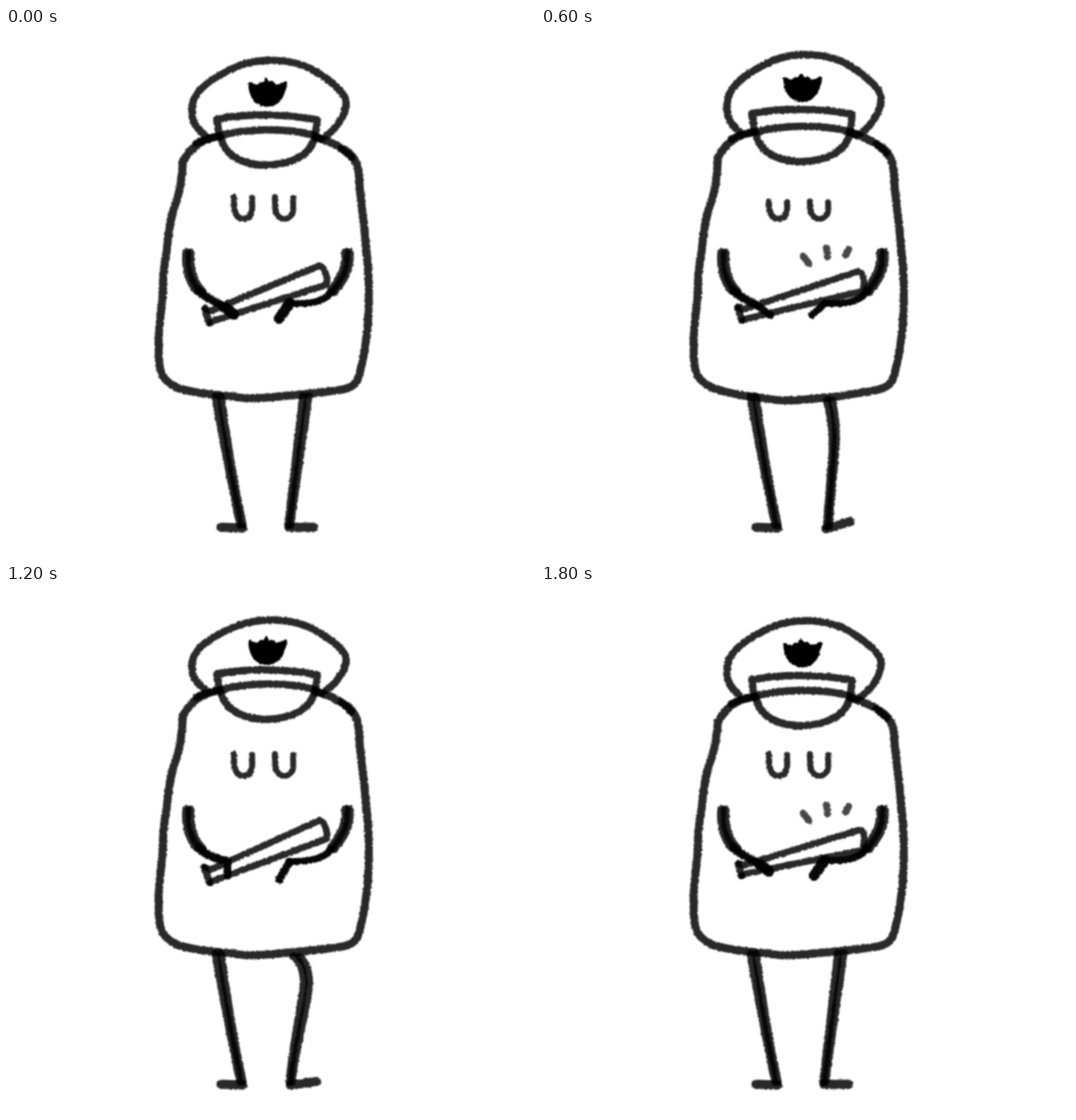
An HTML page that plays this animation: 748x748 px, repeating every 2 s.

```html
<!DOCTYPE html>
<html lang="en">
<head>
<meta charset="utf-8">
<title>Waiting officer</title>
<style>
  html, body { margin: 0; width: 100%; height: 100%; overflow: hidden; background: #fff; }
  svg { display: block; width: 100vw; height: 100vh; }
</style>
</head>
<body>
<svg viewBox="0 0 748 748">
  <defs>
    <filter id="chalk" filterUnits="userSpaceOnUse" x="0" y="0" width="748" height="748" color-interpolation-filters="sRGB">
      <feTurbulence type="fractalNoise" baseFrequency=".3" numOctaves="2" seed="4" result="grain"/>
      <feDisplacementMap in="SourceGraphic" in2="grain" scale="3.6" xChannelSelector="R" yChannelSelector="G"/>
      <feGaussianBlur stdDeviation=".8"/>
    </filter>
  </defs>
  <g id="art" filter="url(#chalk)" fill="none" stroke="#000" stroke-linecap="round" stroke-linejoin="round"></g>
</svg>
<script>
const STEP = 200;

const line = (d, w = 10.5, o = 0.84) => `<path d="${d}" stroke-width="${w}" stroke-opacity="${o}"/>`;
const at = (x, y, s) => `<g transform="translate(${x} ${y})">${s}</g>`;
const thick = (d, off, w = 10) => at(-off, 0, line(d, w)) + at(off, 0, line(d, w));

// Baton corners: grip top, tip top, tip bottom, grip bottom
const batons = {
  mid:  [[282, 397], [443, 336], [453, 363], [288, 417]],
  down: [[281, 399], [443, 333], [453, 359], [289, 421]],
  hit:  [[279, 395], [449, 344], [455, 372], [285, 414]],
  rest: [[280, 394], [451, 346], [455, 375], [284, 411]],
  up:   [[285, 404], [439, 328], [451, 353], [292, 426]]
};
// Hands: left wrist and tip, right wrist and tip, width
const hands = {
  fist:  ['308 394', '322 405', '401 389', '386 411', 15],
  hang:  ['313 391', '313 411', '401 391', '386 417', 11],
  slide: ['303 391', '325 406', '402 389', '383 406', 10],
  lift:  ['318 392', '333 405', '409 391', '396 418', 9]
};
const legs = {
  straight: ['M420 520 L399 703', 'M428 520 L402 703'],
  bent: ['M406 525 C417 532 421 548 421 562 C418 600 404 655 401 703',
         'M414 525 C425 532 428 548 429 562 C426 600 409 655 404 703'],
  soft: ['M404 526 C409 545 414 570 412 600 L404 705',
         'M411 526 C416 545 419 570 416 600 L407 705']
};
const feet = {
  flat: 'M400 706 L435 706',
  low:  'M402 707 L439 702',
  high: 'M401 707 L432 696',
  tap:  'M403 708 L437 698'
};

// Hat top and bottom, then offsets of badge, band, visor, shoulders and hem
const levels = {
  calm:  { top: 45, base: 152, badge: 0, band: 0, visor: 0, body: 0, hem: 0 },
  sink:  { top: 50, base: 157, badge: 5, band: 5, visor: 5, body: 5, hem: 0 },
  wait:  { top: 49, base: 148, badge: 1.5, band: -3, visor: -4, body: -4, hem: 0 },
  rise:  { top: 37, base: 148, badge: -7, band: -8, visor: -5, body: -6, hem: 3 },
  peak:  { top: 29, base: 147, badge: -15, band: -13, visor: -8, body: -8, hem: 0 }
};
const pose = (level, baton, hand, leg, foot, eye = 239, sparks = false) =>
  ({ ...levels[level], baton: batons[baton], hand: hands[hand], leg: legs[leg], foot: feet[foot], eye, sparks });

const calm = pose('calm', 'mid', 'fist', 'straight', 'flat');
const sink = pose('sink', 'up', 'lift', 'bent', 'high', 246);
const wait = pose('wait', 'down', 'hang', 'bent', 'low');
const rise = pose('rise', 'hit', 'slide', 'soft', 'tap', 245, true);
const peak = pose('peak', 'mid', 'fist', 'straight', 'flat');
const rest = pose('sink', 'rest', 'fist', 'straight', 'flat', 239, true);
const cycle = [calm, sink, wait, rise, peak, rise, wait, sink, calm, rest];

function hat(p) {
  const k = (p.base - p.top) / 107;
  const y = v => (p.base - (152 - v) * k).toFixed(1);
  const crown = `M281 ${y(151)} C266 ${y(139)} 260 ${y(128)} 264 ${y(107)} ` +
    `C268 ${y(84)} 302 ${y(65)} 330 ${y(53)} C362 ${y(42)} 399 ${y(43)} 430 ${y(57)} ` +
    `C451 ${y(69)} 480 ${y(89)} 481 ${y(105)} C481 ${y(125)} 465 ${y(144)} 452 ${y(153)}`;
  const badge = '<path d="M345 79 Q351 84 357 82 Q361 76 364 80 L368 74 L373 80 Q376 75 380 82 ' +
    'Q388 83 395 78 C392 97 384 109 369 109 C354 109 346 97 345 79Z" fill="#000" stroke-width="5"/>';
  const band = line('M302 154 L298 129 C340 121 395 121 440 130 L437 155');
  const visor = line('M304 152 C340 142 395 141 434 151') +
    line('M304 155 C309 180 334 194 368 194 C402 193 429 181 436 157');
  return line(crown) + at(0, p.badge, badge) + at(0, p.band, band) + at(0, p.visor, visor);
}

function body(p) {
  const s = v => v + p.body;
  const h = v => v + p.hem;
  return line(`M300 ${s(153)} C277 ${s(158)} 263 ${s(166)} 250 ${s(189)} C249 212 247 226 242 242 ` +
    `C235 260 231 280 229 300 C226 328 221 345 222 368 C221 400 214 425 216 455 C216 488 220 498 241 508 ` +
    `C260 516 292 ${h(518)} 320 ${h(521)} C345 ${h(527)} 380 ${h(521)} 420 ${h(518)} ` +
    `C465 512 489 515 497 497 C510 460 514 405 513 360 C511 315 505 270 501 235 ` +
    `C498 208 502 ${s(192)} 484 ${s(176)} C472 ${s(168)} 458 ${s(160)} 440 ${s(155)}`, 11.5) +
    line(`M302 ${s(153)} Q283 ${s(156)} 269 ${s(163)}`) +
    line(`M474 ${s(170)} L489 ${s(183)}`) +
    line(`M437 ${s(153)} L446 ${s(157)}`, 11);
}

function eyes(y) {
  const eye = x => line(`M${x} ${y} L${x + 1} 257 C${x + 3} 274 ${x + 25} 274 ${x + 26} 257 L${x + 26} ${y + 1}`, 8.5);
  return eye(322) + eye(380);
}

function baton([a, b, c, d]) {
  const grip = k => [a[0] + (d[0] - a[0]) * k + 6, a[1] + (d[1] - a[1]) * k - 2];
  return line(`M${a} L${grip(0.25)} L${b} Q${b[0] + 8} ${b[1] + 2} ${c[0] + 1} ${c[1] - 8} L${c} L${grip(0.95)} L${d}`, 9.5) +
    line(`M${a[0] - 1} ${a[1]} L${d[0] - 1} ${d[1]}`, 10);
}

function arms([lw, lt, rw, rt, w]) {
  const left = 'M258 318 C256 344 263 361 275 373';
  const right = 'M483 317 C484 343 473 359 461 373';
  return thick(left, 2.5, 12.5) + thick(right, 2.5, 12.5) +
    thick(`M273 372 C284 384 296 386 ${lw}`, 1, 11) +
    thick(`M461 373 C449 387 432 391 ${rw}`, 1, 9.5) +
    line(`M${lw} L${lt}`, w, 0.97) + line(`M${rw} L${rt}`, w, 0.97);
}

function draw(p) {
  const shins = ['M296 521 C306 580 318 640 331 703', 'M304 521 C312 580 321 640 335 703', ...p.leg];
  const legPair = shins.map(d => line(d, 11)).join('') + line('M304 706 L335 707', 13) + line(p.foot, 13);
  const sparks = p.sparks
    ? ['M371 323 L379 333', 'M404 311 L405 324', 'M435 313 L431 321'].map(d => line(d, 10, 0.72)).join('')
    : '';
  return body(p) + hat(p) + eyes(p.eye) + legPair + baton(p.baton) + arms(p.hand) + sparks;
}

const art = document.getElementById('art');
const start = performance.now();
let shown = null;

function tick() {
  const t = Math.max(0, performance.now() - start);
  const p = cycle[Math.floor(t / STEP) % cycle.length];
  if (p !== shown) {
    art.innerHTML = draw(p);
    shown = p;
  }
  requestAnimationFrame(tick);
}
tick();
</script>
</body>
</html>
```
